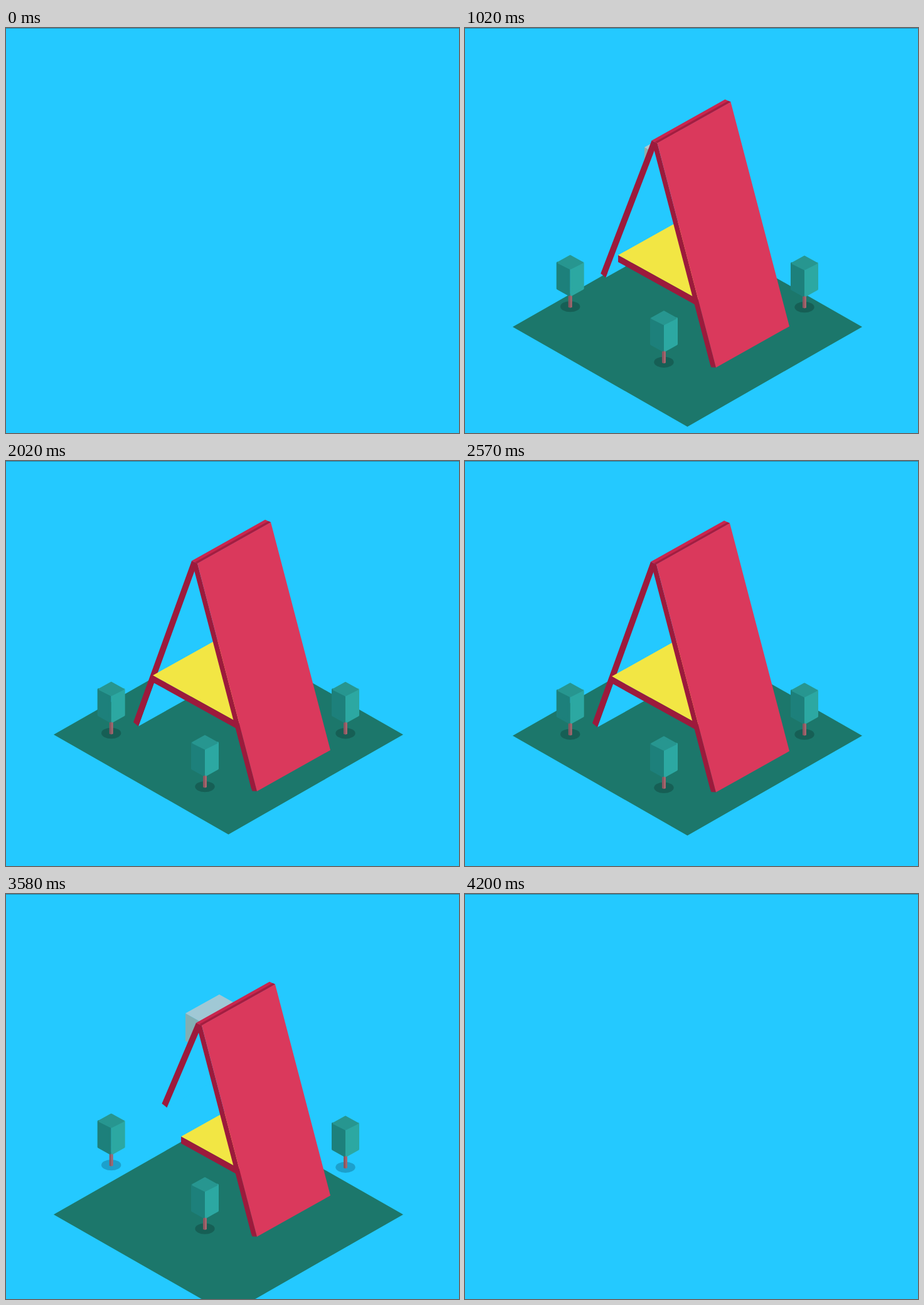
Write an HTML page without scripts that moves like this. It is 722x645 px and loops after 4.46 s.

```html
<!DOCTYPE html>
<html lang="en">
<head>
<meta charset="utf-8">
<title>Folding cabin</title>
<style>
/* clock of the build-up in ms; it runs forward, then back */
@property --s { syntax: "<number>"; inherits: true; initial-value: 200; }

html, body { margin: 0; width: 100%; height: 100%; overflow: hidden; background: #24c9ff; }

svg {
  display: block;
  width: 722px;
  height: 645px;
  animation: clock 2230ms -10ms infinite alternate;

  /* remaining share of each movement, 1 to 0 */
  --roof: pow(clamp(0, (1465 - var(--s)) / 1260, 1), 4);
  --wing: pow(clamp(0, (1526 - var(--s)) / 902, 1), 3);
  --deck: pow(clamp(0, (1481 - var(--s)) / 935, 1), 4);

  /* heights on the stage */
  --base: (524.4 + pow((2460 - var(--s)) * .0028, 2));
  --land: (var(--base) - 90.2 + pow(max(0, 1739 - var(--s)) * .00409, 3));

  /* grown lengths */
  --k: (1 - var(--roof));
  --h: (1 - var(--wing));
  --w: max(0, 142 - 170 * var(--deck));
  --lx: calc(-95 * var(--k));
  --ly: calc(-363 * var(--k));
  --mx: calc(-93 * var(--h) - 32 * var(--h) * var(--wing));
  --my: calc(257 * var(--h));
  --wx: calc(-1 * var(--w));
  --wy: calc(-.553 * var(--w));
}

@keyframes clock {
  0% { --s: 200; animation-timing-function: steps(1); }
  11.66% { --s: 260; animation-timing-function: steps(4); }
  24.66% { --s: 550; animation-timing-function: steps(4); }
  36.32% { --s: 810; animation-timing-function: steps(3); }
  45.74% { --s: 1020; animation-timing-function: steps(5); }
  60.54% { --s: 1350; animation-timing-function: steps(10); }
  90.58% { --s: 2020; animation-timing-function: steps(2); }
  96.86%, 100% { --s: 2160; }
}

.land {
  fill: #1c776b;
  transform: translateY(calc(var(--land) * 1px));
  opacity: clamp(0, (var(--s) - 230) / 150, 1);
}
.tree {
  transform: translate(var(--x), calc((var(--base) + var(--y) - var(--drop) * var(--roof)) * 1px));
  opacity: clamp(0, (var(--s) - 340) / 180, 1);
}
.chimney { opacity: clamp(0, (var(--s) - 600) / 300, .8); }
.house {
  transform: translateY(calc(var(--base) * 1px));
  opacity: clamp(0, var(--s) - 200, 1);
}

/* each face is a unit square laid along two vectors */
.face { width: 1px; height: 1px; }
.dark { fill: #9c1a3c; }
.inside {
  fill: #24c9ff;
  transform: matrix(117, -65.5, var(--mx), var(--my), calc(399 + var(--lx)), calc(2.5 + var(--ly)));
}
.wing { transform: matrix(8, 6.5, var(--mx), var(--my), calc(391 + var(--lx)), calc(-4 + var(--ly))); }
.deck { fill: #f2e644; transform: matrix(var(--wx), var(--wy), 111, -62, 376, -106); }
.rim { transform: matrix(var(--wx), var(--wy), 0, 11, 376, -106); }
.edge { transform: matrix(-9, -4, var(--lx), var(--ly), 400, 0); }
.slope { fill: #da395c; transform: matrix(117, -65.5, var(--lx), var(--ly), 400, 0); }
.ridge {
  fill: #c9264e;
  transform: matrix(117, -65.5, -9, -4, calc(400 + var(--lx)), var(--ly));
}
.ridge.dark { height: .42px; fill: #a41d40; }
</style>
</head>
<body>
<svg viewBox="0 0 722 645" xmlns="http://www.w3.org/2000/svg">
  <defs>
    <g id="tree" stroke-linejoin="round">
      <ellipse cy="82.5" rx="15.7" ry="8.7" fill="#000" fill-opacity=".2"/>
      <path d="M-3 62H0V84.500L-3 83.500Z" fill="#8a5660"/>
      <path d="M0 62H3V83.500L0 84.500Z" fill="#a5656d"/>
      <path d="M-20 13L-2 24V63.600L-20 53.600Z" fill="#1d807b" stroke="#1d807b" stroke-width="4"/>
      <path d="M20 13L2 24V63.600L20 53.600Z" fill="#2ca8a2" stroke="#2ca8a2" stroke-width="4"/>
      <path d="M0 2L19 12.500L0 22L-19 12.500Z" fill="#279690" stroke="#279690" stroke-width="3"/>
    </g>
  </defs>

  <rect width="722" height="645" fill="#24c9ff"/>
  <path class="land" d="M76 0L354.500 -158.500L633 0L354.500 159Z"/>

  <use href="#tree" class="tree" style="--x:167.7px;--y:-174.9;--drop:297"/>
  <use href="#tree" class="tree" style="--x:541px;--y:-174.7;--drop:251"/>
  <use href="#tree" class="tree" style="--x:317px;--y:-89.8;--drop:74"/>

  <g class="chimney">
    <path d="M286 190L318 208V252L286 234Z" fill="#aaa594"/>
    <path d="M286 190L340 160L372 178L318 208Z" fill="#d5c8c4"/>
  </g>

  <g class="house">
    <rect class="face inside"/>
    <rect class="face wing dark"/>
    <rect class="face deck"/>
    <rect class="face rim dark"/>
    <rect class="face edge dark"/>
    <path class="dark" d="M391 -4L392.500 -.5L400 0Z"/>
    <rect class="face slope"/>
    <rect class="face ridge"/>
    <rect class="face ridge dark"/>
  </g>

  <rect width="722" height="1" fill="#2286ad"/>
</svg>
</body>
</html>
```
